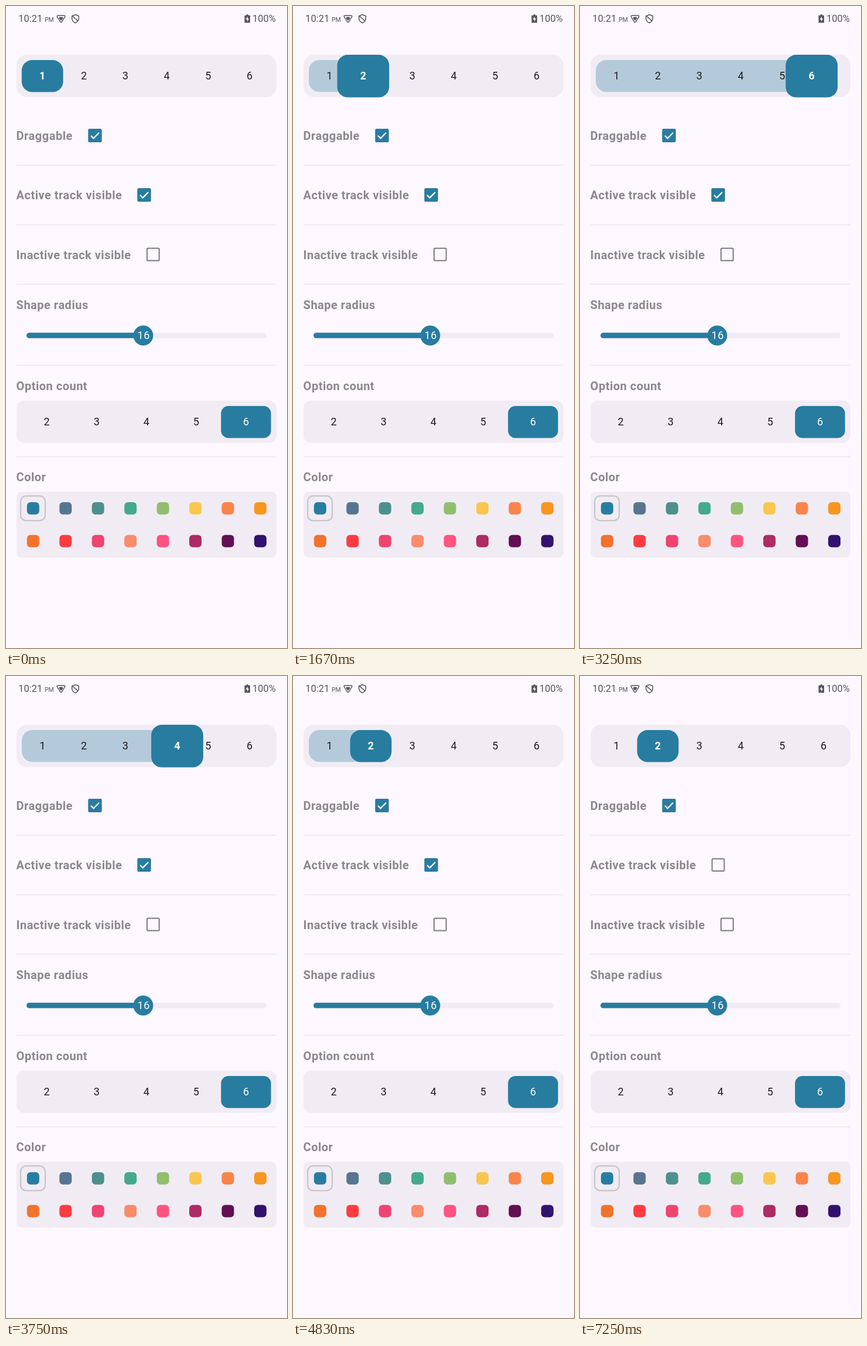
Write an HTML page that moves like this. It is 480 by 1093 pixels and loops after 8 s.

```html
<!DOCTYPE html>
<html lang="en">
<head>
<meta charset="utf-8">
<title>Segmented option slider</title>
<style>
  html, body { margin: 0; width: 100%; height: 100%; overflow: hidden; background: #fdf7ff; }
  svg { display: block; width: 480px; height: 1093px; }
  text { font-family: Roboto, sans-serif; font-size: 18px; fill: #1d1b20; }
  .label { font-size: 20px; font-weight: 700; letter-spacing: .5px; fill: #8b878c; }
  .num { text-anchor: middle; }
  .on { fill: #fff; }
  .bold { font-weight: 700; }
  .status { font-size: 16.4px; fill: #57545a; }
</style>
</head>
<body>
<svg id="stage" viewBox="0 0 480 1093"></svg>
<script>
const LOOP = 8000, FPS = 12;
const TEAL = '#277ca0', PANEL = '#f1ecf4', GRAY = '#57545a', OUTLINE = '#7d7980';
const stage = document.getElementById('stage');

function add(tag, attrs, parent = stage) {
  const el = document.createElementNS('http://www.w3.org/2000/svg', tag);
  set(el, attrs);
  parent.appendChild(el);
  return el;
}
function set(el, attrs) {
  for (const key in attrs) el.setAttribute(key, attrs[key]);
}
function rect(x, y, width, height, rx, fill, more) {
  return add('rect', { x, y, width, height, rx, fill, ...more });
}
function path(d, stroke, width, more) {
  return add('path', { d, stroke, 'stroke-width': width, fill: 'none', ...more });
}
function text(str, x, y, cls) {
  const el = add('text', { x, y, class: cls });
  el.textContent = str;
  return el;
}

// Status bar
text('10:21', 21.3, 27.3, 'status');
text('PM', 66, 27.3, 'status').style.fontSize = '10.5px';
text('100%', 421, 27, 'status');
path('M88.5 16.3H99.5Q101.6 16.6 100.4 18.6L95 27.3Q94 28.4 93 27.3L87.6 18.6Q86.4 16.6 88.5 16.3Z', GRAY, 1.5);
path('M91 18.8H97V21.5L94 25L91 21.5Z', 'none', 0, { fill: GRAY });
path('M118.5 14.8L124.3 17V21.5Q124 26.3 118.5 28.8Q113 26.3 112.7 21.5V17ZM114 17.5L123.2 25.6', GRAY, 1.5);
path('M410.5 14.5H414V16H417V28.5H407.5V16H410.5Z', 'none', 0, { fill: GRAY });
path('M413 17.8L409.6 23H412V26.6L415.2 21.4H413Z', 'none', 0, { fill: '#fdf7ff' });

// Labels and dividers
const labels = [
  ['Draggable', 227.8], ['Active track visible', 329], ['Inactive track visible', 430.5],
  ['Shape radius', 515.7], ['Option count', 653.5], ['Color', 809.3]
];
for (const [name, y] of labels) text(name, 17.6, y, 'label');
for (const y of [270.5, 372, 473, 611, 767]) rect(18, y, 444, 1.2, 0, '#e8e2ea');

function checkbox(cx, cy) {
  const ripple = add('circle', { cx, cy, r: 0, fill: TEAL, opacity: 0 });
  rect(cx - 10.4, cy - 10.4, 20.8, 20.8, 1.5, 'none', { stroke: OUTLINE, 'stroke-width': 2 });
  const fill = rect(cx - 11.5, cy - 11.5, 23, 23, 2, TEAL, { opacity: 0 });
  const tick = path(`M${cx - 7} ${cy + .3}l4.6 4.6l9.4 -9.6`, '#fff', 2.3, { opacity: 0 });
  return { ripple, check: v => { set(fill, { opacity: v }); set(tick, { opacity: v }); } };
}
checkbox(152, 220.5).check(1);
const active = checkbox(236, 321.7);
checkbox(251.3, 423);

// Radius slider
rect(35, 556.3, 410, 9.2, 4.6, PANEL);
rect(35, 556.3, 200, 9.2, 4.6, TEAL);
add('circle', { cx: 234.4, cy: 561, r: 17, fill: TEAL });
text('16', 235.2, 567.3, 'num on').style.letterSpacing = '.5px';

// Option count
rect(18, 671.7, 444, 72, 13, PANEL);
rect(367.3, 681, 85.4, 54.4, 12.5, TEAL);
for (let i = 0; i < 5; i++) text(i + 2, 69.6 + 85.1 * i, i < 4 ? 713.6 : 714.4, i < 4 ? 'num' : 'num on');

// Color palette
const colors = ['#277da1', '#577590', '#4d908e', '#43aa8b', '#90be6d', '#f9c74f', '#f9844a', '#f8961e',
  '#f3722c', '#fd3c42', '#ef446f', '#f88c6b', '#ff5380', '#ad2b66', '#620f54', '#32126e'];
rect(18, 827, 444, 112, 8.5, PANEL);
rect(25, 834.2, 42, 42, 9.5, 'none', { stroke: '#c9c5cb', 'stroke-width': 2.3 });
colors.forEach((c, i) => rect(35.8 + 55.45 * (i % 8), 844.8 + 55.8 * (i >> 3), 21, 21, 6, c));

// Segmented slider
const cellX = i => 62.2 + 70.75 * i;
rect(18, 82.7, 444, 72.3, 18, PANEL);
const track = rect(27, 92, 71, 54.3, 18, TEAL);
for (let i = 0; i < 6; i++) text(i + 1, cellX(i), 124.8, 'num');
const thumb = rect(0, 0, 71, 54, 18, TEAL);
const thumbText = text('1', 0, 125.3, 'num on bold');

// Time in ms, thumb centre
const drag = [[1250, 62.2], [1420, 68], [1667, 120], [2250, 283], [2670, 398], [2833, 415.9], [2917, 415.9],
  [3250, 395.7], [3750, 292.5], [4250, 187], [4583, 137], [4833, 133]];

const clamp = v => Math.min(1, Math.max(0, v));
const span = (t, a, b) => clamp((t - a) / (b - a));
const easeOut = v => 1 - (1 - v) ** 3;

// Monotone cubic through the points
function curve(pts, t) {
  const last = pts.length - 1;
  if (t <= pts[0][0]) return pts[0][1];
  if (t >= pts[last][0]) return pts[last][1];
  const slope = i => (pts[i + 1][1] - pts[i][1]) / (pts[i + 1][0] - pts[i][0]);
  const tangent = i => {
    if (i === 0 || i === last) return 0;
    const a = slope(i - 1), b = slope(i);
    return a * b <= 0 ? 0 : 2 * a * b / (a + b);
  };
  const i = pts.findIndex(p => p[0] > t) - 1;
  const h = pts[i + 1][0] - pts[i][0], u = (t - pts[i][0]) / h;
  const w = u * u * (3 - 2 * u);
  return pts[i][1] * (1 - w) + pts[i + 1][1] * w
    + h * u * (1 - u) * (tangent(i) * (1 - u) - tangent(i + 1) * u);
}

function draw(t) {
  const x = curve(drag, t);
  const grow = 9 * (easeOut(span(t, 1270, 1520)) - easeOut(span(t, 4550, 4833)));
  set(thumb, { x: x - 35.4 - grow, y: 92.1 - grow, width: 70.8 + 2 * grow, height: 54.4 + 2 * grow });
  set(thumbText, { x });
  thumbText.textContent = Math.round((x - cellX(0)) / 70.75) + 1;
  set(track, { width: x - 27 + 10, opacity: .3 * (1 - easeOut(span(t, 6420, 7200))) });

  active.check(1 - span(t, 6450, 6580));
  set(active.ripple, {
    r: 8 + 15 * easeOut(span(t, 6250, 6500)),
    opacity: .12 * (span(t, 6250, 6330) - span(t, 6500, 6700))
  });
}

const start = performance.now();
function tick(now) {
  const t = Math.max(0, now - start) % LOOP;
  draw(Math.floor((t + 4) * FPS / 1000) * 1000 / FPS);
  requestAnimationFrame(tick);
}
draw(0);
requestAnimationFrame(tick);
</script>
</body>
</html>
```
